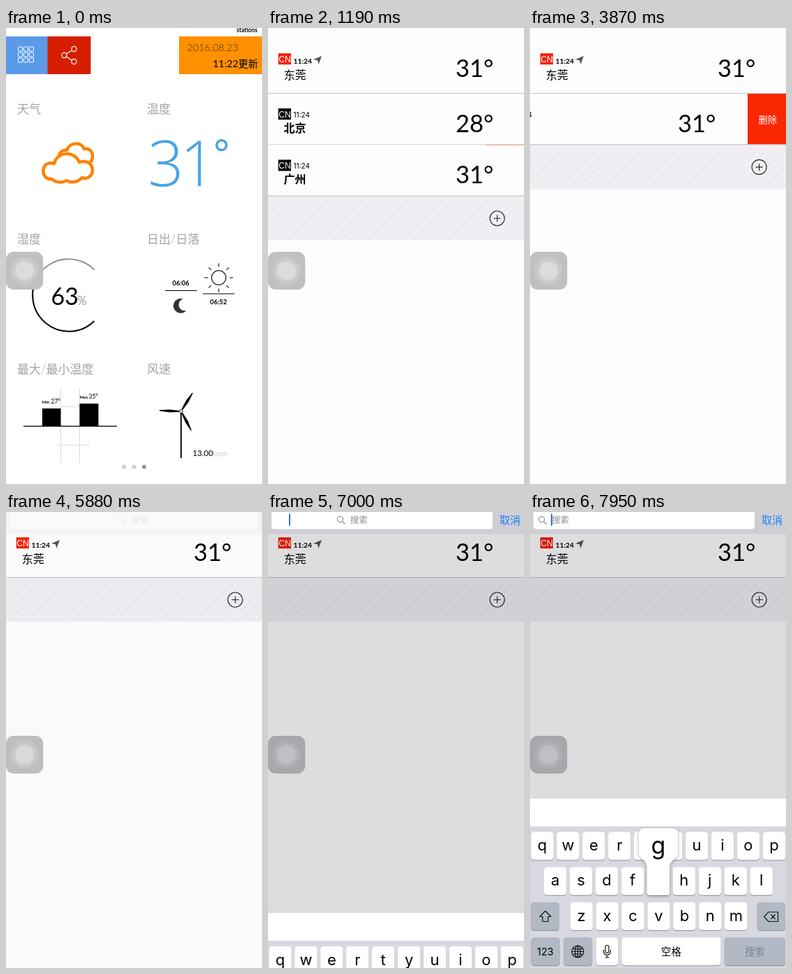
Animation of 367 by 652 pixels, one loop 8 s. Source, as an HTML page:

```html
<!DOCTYPE html>
<html lang="zh">
<head>
<meta charset="utf-8">
<title>天气</title>
<style>
html, body { margin: 0; width: 100%; height: 100%; overflow: hidden; background: #fdfdfd; }
svg { display: block; width: 367px; height: 652px; }
text { font-family: Lato, "Noto Sans CJK SC", "Noto Sans CJK", sans-serif; white-space: pre; }
.ui { font-family: Inter, "Noto Sans CJK SC", "Noto Sans CJK", sans-serif; }
.big { font-family: "Open Sans", sans-serif; font-weight: 300; }
.badge { font-family: "Liberation Sans", sans-serif; font-size: 12.3px; fill: #fff; }
.title { font-size: 17px; font-weight: 300; fill: #a3a3a3; }
.bold { font-weight: 700; }
.mid { text-anchor: middle; }
.line { fill: none; stroke: #000; }
</style>
</head>
<body>
<svg viewBox="0 0 367 652">
  <defs>
    <pattern id="stripes" width="9" height="9" patternUnits="userSpaceOnUse" patternTransform="rotate(45)">
      <rect width="9" height="9" fill="#f2f0f4"/><rect width="4" height="9" fill="#eeecf0"/>
    </pattern>
  </defs>
  <rect width="367" height="652" fill="#fdfdfd"/>
  <g id="list"></g>

  <g id="dashboard">
    <rect width="367" height="652" fill="#fff"/>
    <text class="bold" x="330.500" y="5.500" font-size="8.500">stations</text>
    <rect y="12" width="60" height="54" fill="#5a9ae8"/>
    <rect x="59.500" y="12" width="62" height="54" fill="#d61d00"/>
    <rect x="248" y="12" width="119" height="54" fill="#ff9000"/>
    <g id="grid" fill="none" stroke="#fff"></g>
    <g fill="none" stroke="#fff" stroke-width="1.200">
      <circle cx="83.500" cy="39" r="3.600"/><circle cx="97.500" cy="30" r="3.600"/><circle cx="97.500" cy="48" r="3.600"/>
      <path d="M86.500 37 94.500 32M86.500 41 94.500 46"/>
    </g>
    <text x="259.500" y="32.500" font-size="14.400" font-weight="300" fill="#46300c">2016.08.23</text>
    <text x="296.500" y="56" font-size="14.200">11:22更新</text>
    <g id="titles"></g>

    <g fill="#fff" stroke="#ff8200" stroke-width="4.500" stroke-linejoin="round">
      <path d="M76 184C76 177 82 174 87 175C91 163 108 162 112 173C119 171 125 177 124 184C124 191 119 195 113 194H80Z"/>
      <path d="M66 216C57 217 53 210 53.500 203C54 195 62 191 69 194C73 176 99 175 105 192C115 188 124 194 124 203C124 212 116 217 109 214C102 222 91 221 87 218C81 222 71 221 66 216Z"/>
    </g>
    <g fill="#4aa3e6">
      <text class="big" font-size="90"><tspan x="203.500" y="226">3</tspan><tspan x="249.500" y="226">1</tspan></text>
      <circle cx="309" cy="167.500" r="7" fill="none" stroke="#4aa3e6" stroke-width="3.500"/>
    </g>

    <path class="line" d="M47.400 352.200A52 52 0 0 1 126.500 345.500" stroke-width="1.800" style="stroke:#8b8b8b"/>
    <path class="line" d="M126.500 419A52 52 0 0 1 47.400 352.200" stroke-width="2"/>
    <text x="64.500" y="395.500" font-size="34">63</text>
    <text x="102.500" y="395.500" font-size="17" font-weight="300" fill="#555">%</text>

    <text class="bold" x="238.500" y="368" font-size="9.400">06:06</text>
    <text class="bold" x="292.500" y="395" font-size="9.400">06:52</text>
    <path class="line" d="M228 375.500H274M282 380H327.500" stroke-width="1.200"/>
    <path d="M254 387.300A10.500 10.500 0 1 0 258.500 404A8.500 8.500 0 0 1 254 387.300Z" fill="#333"/>
    <g id="sun" fill="none" stroke="#444" stroke-width="1.500"><circle cx="305" cy="357" r="10.300"/></g>

    <path class="line" d="M78.500 515V622M105.500 515V622M78.500 541.500H105.500M75 596.500H120" style="stroke:#d9d9d9"/>
    <path d="M52 544H78.500V569H52ZM105.500 537H132.500V569H105.500Z"/>
    <path class="line" d="M25 569.300H159" stroke-width="1.200"/>
    <text class="bold" x="51.500" y="536.500" font-size="6">Min</text>
    <text x="64.500" y="536.500" font-size="8.500">27°</text>
    <text class="bold" x="105.500" y="529.500" font-size="6">Max</text>
    <text x="118.500" y="529.500" font-size="8.500">35°</text>

    <path class="line" d="M251 548V615" stroke-width="1.800"/>
    <g id="blades"></g>
    <circle cx="251" cy="548" r="2.300" fill="#fff" stroke="#000"/>
    <text x="267.500" y="612" font-size="11.500">13.00</text>
    <text x="296.500" y="612" font-size="9" font-weight="300" fill="#aaa">kmph</text>
    <circle cx="169.300" cy="627.500" r="3" fill="#cdcdcd"/>
    <circle cx="183.700" cy="627.500" r="3" fill="#cdcdcd"/>
    <circle cx="198" cy="627.500" r="3" fill="#979797"/>
  </g>

  <g id="assist">
    <rect y="320" width="53.300" height="54" rx="11" fill="#c1bfc2"/>
    <circle cx="26.500" cy="347" r="20" fill="#c9c7ca"/>
    <circle cx="26.500" cy="347" r="16" fill="#cfcdd0"/>
    <circle cx="26.500" cy="347" r="13" fill="#dddbde"/>
  </g>

  <rect id="dim" width="367" height="652" fill="#0e001e"/>
  <g id="search">
    <rect width="367" height="31.500" fill="#cfced5"/>
    <rect id="field" x="5" y="-8" height="32.500" rx="4.500" fill="#fff"/>
    <g id="hint">
      <g fill="none" stroke="#85858a" stroke-width="1.100"><circle cx="4.500" cy="10.500" r="4"/><path d="M7.500 13.500 11.500 17.500"/></g>
      <text x="18.700" y="16" font-size="12.500" fill="#8e8e93">搜索</text>
    </g>
    <rect id="caret" x="30" y="2.500" width="2" height="17" fill="#3b6cf0"/>
    <text id="cancel" y="17" font-size="15" fill="#1c7ef8">取消</text>
  </g>

  <g id="keyboard">
    <rect y="409" width="367" height="260" fill="#d7d8e0"/>
    <rect y="409" width="367" height="40.500" fill="#fff"/>
    <path d="M0 409.300H367" stroke="#c9c8cc" stroke-width=".7"/>
    <g id="keys"></g>
    <g fill="none" stroke="#111" stroke-width="1.200" stroke-linejoin="round">
      <path d="M22 570.500 30 578.500H26V585.500H18V578.500H14Z"/>
      <path d="M342 572H355.500V585.500H342L335.500 578.700ZM345.500 575.500 351.500 582M351.500 575.500 345.500 582"/>
      <circle cx="68.500" cy="628.500" r="8.500"/><ellipse cx="68.500" cy="628.500" rx="4" ry="8.500"/>
      <path d="M60 628.500H77M68.500 620V637M61.500 624Q68.500 626.500 75.500 624M61.500 633Q68.500 630.500 75.500 633"/>
      <rect x="108" y="619.500" width="5" height="11" rx="2.500"/>
      <path d="M105.500 626V628.500A5 5 0 0 0 115.500 628.500V626M110.500 633.500V637M107.500 637H113.500"/>
    </g>
    <g id="popup">
      <path d="M164 452H204Q212 452 212 460V487C212 497 200.200 497 200.200 508V544Q200.200 548 196.200 548H171.600Q167.600 548 167.600 544V508C167.600 497 156 497 156 487V460Q156 452 164 452Z" fill="#fff" style="filter:drop-shadow(0 1px 2px #0005)"/>
      <text class="ui mid" x="184" y="488.500" font-size="34">g</text>
    </g>
  </g>
</svg>
<script>
const LOOP = 8000, ROW = 73.4, TOP = 93.5, SWIPE = 57;
const $ = id => document.getElementById(id);
const move = (id, x, y) => $(id).setAttribute('transform', `translate(${x} ${y})`);
const fade = (id, a) => $(id).setAttribute('opacity', a);

const clamp = v => Math.min(1, Math.max(0, v));
const span = (t, a, b) => clamp((t - a) / (b - a));
const easeInOut = p => p * p * (3 - 2 * p);
const easeOut = p => 1 - (1 - p) ** 3;

const badge = (y, color) =>
  `<rect x="14.700" y="${y}" width="18.300" height="16" fill="${color}"/><text class="badge" x="15.200" y="${y + 12.5}">CN</text>`;

const cityRow = (id, city, temp) => `<g id="${id}">
  <rect y=".5" width="367" height="${ROW}" fill="#fdfdfd"/>
  <rect x="312" y=".2" width="55" height="73" fill="#fa2800"/>
  <text x="327.500" y="42" font-size="13.300" fill="#fff">删除</text>
  <g id="${id}Face">
    <rect y=".4" width="369" height="${ROW - .7}" fill="#fdfdfd"/>
    ${badge(21.5, '#000')}
    <text class="ui" x="36.500" y="34.500" font-size="10">11:24</text>
    <text class="bold" x="22.500" y="55.500" font-size="16">${city}</text>
    <text x="269" y="55" font-size="34.500">${temp}°</text>
  </g>
  <path d="M0 ${ROW}H367" stroke="#c3c2c6"/>
</g>`;

$('list').innerHTML = cityRow('rowA', '北京', 28) + cityRow('rowB', '广州', 31) + `
<g id="footer">
  <rect width="367" height="230" fill="#fdfdfd"/>
  <rect width="367" height="63.500" fill="url(#stripes)"/>
  <path d="M0 0H367" stroke="#c3c2c6"/>
  <g fill="none" stroke="#222" stroke-width="1.100"><circle cx="328.600" cy="32" r="10.500"/><path d="M323.500 32H333.700M328.600 27V37"/></g>
</g>
<rect width="367" height="${TOP}" fill="#fdfdfd"/>
<path d="M0 ${TOP}H367" stroke="#c3c2c6"/>
${badge(36.2, '#f3220c')}
<text class="bold" x="36.500" y="51" font-size="10.300">11:24</text>
<path d="M77 40 65 45 71 46.200 72.500 52Z" fill="#555"/>
<text x="22.800" y="72.500" font-size="16">东莞</text>
<text x="269" y="70" font-size="34.500">31°</text>`;

$('grid').innerHTML = [...Array(9).keys()].map(i =>
  `<rect x="${17.5 + i % 3 * 8}" y="${27 + Math.floor(i / 3) * 8}" width="6" height="6" rx=".6"/>`).join('');

$('titles').innerHTML = ['天气', '温度', '湿度', '日出/日落', '最大/最小温度', '风速'].map((s, i) =>
  `<text class="title" x="${i % 2 ? 202 : 16}" y="${121.5 + Math.floor(i / 2) * 186}">${s}</text>`).join('');

$('sun').innerHTML += [...Array(8).keys()].map(i =>
  `<path d="M305 341.500V336.500" transform="rotate(${i * 45} 305 357)"/>`).join('');

$('blades').innerHTML = [32, 152, 272].map(a =>
  `<path d="M250 545 248.800 531 250.500 517H251.700L253 531 252 545Z" transform="rotate(${a} 251 548)"/>`).join('');

function key(x, y, w, label = '', dark = false, size = 22, color = '#000') {
  const fill = dark ? '#b2b8c4' : '#fff';
  return `<rect x="${x}" y="${y + 1}" width="${w}" height="40" rx="4.500" fill="#8d9097"/>
    <rect x="${x}" y="${y}" width="${w}" height="40" rx="4.500" fill="${fill}"/>
    <text class="ui mid" x="${x + w / 2}" y="${y + (size > 20 ? 26.5 : 25.5)}" font-size="${size}" fill="${color}">${label}</text>`;
}
const letters = (row, x, y) => [...row].map((c, i) => key(x + i * 36.93, y, 32.4, c)).join('');

$('keys').innerHTML =
  letters('qwertyuiop', 1.3, 457.5) + letters('asdfghjkl', 20, 507.7) + letters('zxcvbnm', 57.5, 558) +
  key(1.3, 558, 40.5, '', true) + key(325.7, 558, 40.3, '', true) +
  key(1.3, 608.3, 41.2, '123', true, 14.5) + key(48.2, 608.3, 41, '', true) + key(94.6, 608.3, 31.6) +
  key(131.4, 608.3, 142, '空格', false, 14.3) + key(278.7, 608.3, 87.3, '搜索', true, 14.3, '#7d828c');

function draw(t) {
  fade('dashboard', 1 - easeInOut(span(t, 75, 880)));

  const removeA = easeInOut(span(t, 2600, 2920));
  const removeB = easeInOut(span(t, 4410, 4700));
  move('rowA', 0, TOP);
  move('rowB', 0, TOP + ROW * (1 - removeA));
  move('footer', 0, TOP + ROW * (2 - removeA - removeB));
  move('rowAFace', -SWIPE * easeInOut(span(t, 1760, 2440)), 0);
  move('rowBFace', -SWIPE * easeInOut(span(t, 3300, 3870)), 0);
  fade('rowA', 1 - removeA);
  fade('rowB', 1 - removeB);

  const open = span(t, 5850, 6205);
  const edge = 362 - 40 * easeInOut(open) ;
  const focus = easeOut(span(t, 6960, 7290));
  fade('dim', .13 * open);
  fade('search', clamp(open * 1.8));
  $('field').setAttribute('width', edge - 5);
  $('cancel').setAttribute('x', edge + 10);
  fade('cancel', open);
  const centered = edge / 2 - 19.5;
  move('hint', centered + (12.2 - centered) * focus, 0);

  const blink = 1 - span(t, 7500, 7690) + span(t, 7810, 7940);
  fade('caret', t < 7000 ? 0 : blink);
  move('keyboard', 0, 243.5 * (1 - focus));
  fade('popup', t >= 7945 ? 1 : 0);
}

function tick() {
  draw(performance.now() % LOOP);
  requestAnimationFrame(tick);
}
tick();
</script>
</body>
</html>
```
